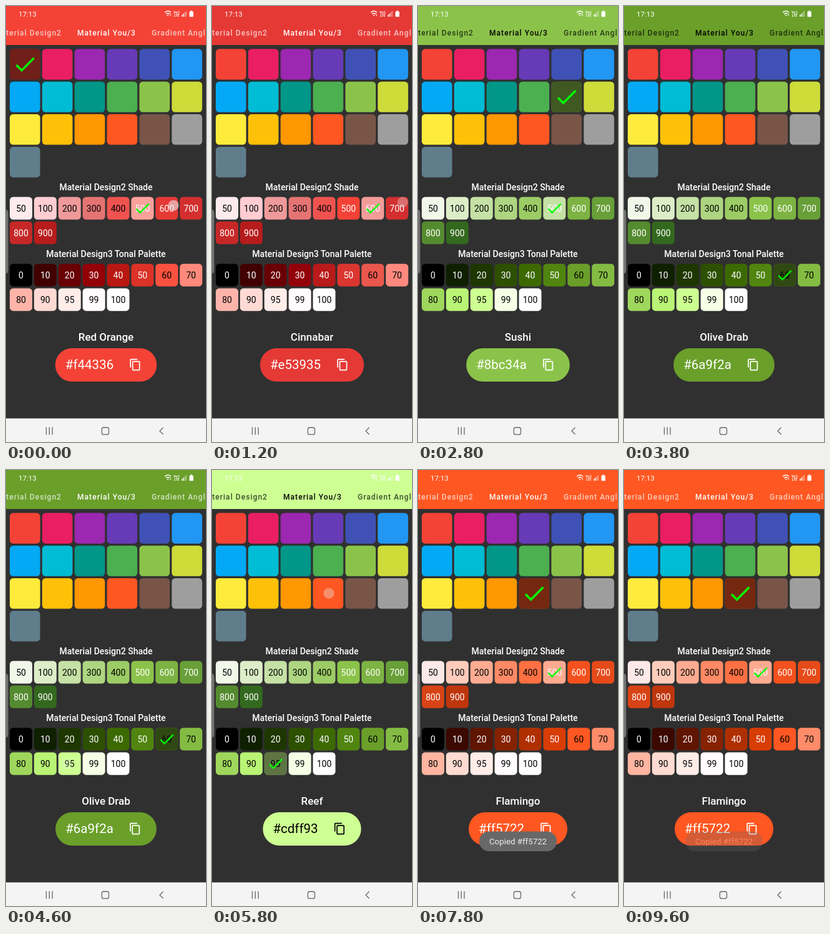
Recreate the animation shown at these times as an HTML page. Size 320 px wide and 693 px high, loop 9.8 s.

```html
<!DOCTYPE html>
<html lang="en">
<head>
<meta charset="utf-8">
<title>Colour palette</title>
<style>
  html, body { margin: 0; width: 100%; height: 100%; overflow: hidden; background: #303030; }
  svg { display: block; width: 100vw; height: 100vh; font-family: Roboto, "Open Sans", sans-serif; }
  .mid { text-anchor: middle; }
  .tile { font-size: 14px; text-anchor: middle; }
  .tab { font-size: 12px; font-weight: 500; letter-spacing: 1.05px; }
  .head { font-size: 14px; font-weight: 500; fill: #fff; text-anchor: middle; }
</style>
</head>
<body>
<svg viewBox="0 0 320 693" preserveAspectRatio="none">
  <rect width="320" height="693" fill="#303030"/>
  <rect id="bar" width="320" height="62"/>

  <g fill="#fff">
    <text x="20" y="16.5" font-size="11.5">17:13</text>
    <g fill="none" stroke="#fff" stroke-width="1.4">
      <path d="M254 10.2q5-4.4 10 0M256 12.7q3-2.6 6 0"/>
    </g>
    <path d="M257.3 14.2h3.4l-1.7 2.3z"/>
    <path d="M262 13.5l1.2-1.6 1.2 1.6zM262 14.6l1.2 1.6 1.2-1.6z"/>
    <text class="mid" x="273" y="11.6" font-size="5.2" font-weight="700">Vo))</text>
    <text class="mid" x="273" y="16.6" font-size="5.2" font-weight="700">LTE</text>
    <path d="M281 14h1.4v3H281zM283.2 12h1.4v5h-1.4z"/>
    <path d="M285.4 10h1.4v7h-1.4zM287.6 8h1.4v9h-1.4z" opacity=".5"/>
    <path d="M295.2 7.6h2.8v1.2h1a.8.8 0 0 1 .8.8v6.8a.8.8 0 0 1-.8.8h-4.8a.8.8 0 0 1-.8-.8V9.600a.8.8 0 0 1 .8-.8h1z"/>
  </g>

  <g id="tabs" class="tab">
    <text x="89" y="47.300" text-anchor="end" opacity=".7">Material Design2</text>
    <text x="114" y="47.300">Material You/3</text>
    <text x="233" y="47.300" opacity=".7">Gradient Angle</text>
  </g>

  <text class="head" x="160" y="293">Material Design2 Shade</text>
  <text class="head" x="160" y="399">Material Design3 Tonal Palette</text>
  <g id="cells"></g>

  <text id="title" class="mid" x="160" y="531.800" font-size="17" font-weight="500" fill="#fff"></text>
  <rect id="pill" y="544" height="53" rx="26.5"/>
  <g id="label">
    <text id="hex" y="577.300" font-size="20.5"></text>
    <path id="copy" d="M16 1H4a2 2 0 0 0-2 2v14h2V3h12zM19 5H8a2 2 0 0 0-2 2v14a2 2 0 0 0 2 2h11a2 2 0 0 0 2-2V7a2 2 0 0 0-2-2zm0 16H8V7h11z"/>
  </g>

  <path d="M0 324q3.500 0 3.500 5v91q0 5-3.500 5z" fill="#8a8a8a" opacity=".75"/>

  <rect y="655.500" width="320" height="38" fill="#f4f4f4"/>
  <g fill="none" stroke="#666" stroke-width="1.300">
    <path d="M64.500 669.500v12M69.300 669.500v12M74.100 669.500v12"/>
    <rect x="153.300" y="670" width="11.200" height="11.200" rx="3"/>
    <path d="M251.500 670l-5.500 5.500 5.500 5.500"/>
  </g>

  <circle id="touch" r="8.500" fill="#e8e8e8"/>
  <g id="toast">
    <rect x="98" y="574.500" width="124" height="31.500" rx="15.700" fill="#686868"/>
    <text class="mid" x="160" y="595" font-size="13.300" fill="#eee">Copied #ff5722</text>
  </g>
</svg>

<script>
const LOOP = 9800;
const $ = id => document.getElementById(id);
const list = s => s.split(' ').map(c => '#' + c);

const MAIN = list('f44336 e91e63 9c27b0 673ab7 3f51b5 2196f3 03a9f4 00bcd4 009688 4caf50 ' +
  '8bc34a cddc39 ffeb3b ffc107 ff9800 ff5722 795548 9e9e9e 607d8b');
const SHADE_NAMES = [50, 100, 200, 300, 400, 500, 600, 700, 800, 900];
const TONE_NAMES = [0, 10, 20, 30, 40, 50, 60, 70, 80, 90, 95, 99, 100];

const SHADES = {
  red: list('ffebee ffcdd2 ef9a9a e57373 ef5350 f44336 e53935 d32f2f c62828 b71c1c'),
  green: list('f1f8e9 dcedc8 c5e1a5 aed581 9ccc65 8bc34a 7cb342 689f38 558b2f 33691e'),
  orange: list('fbe9e7 ffccbc ffab91 ff8a65 ff7043 ff5722 f4511e e64a19 d84315 bf360c')
};
const TONES = {
  red: list('000000 410000 690003 930006 b91812 dc3228 fb5140 ff8a7b ffb4a9 ffdad4 ffedea fffbff ffffff'),
  cinnabar: list('000000 410002 690005 930009 b91a1a dc3630 ea574c ff897e ffb4ab ffdad5 ffedea fffbff ffffff'),
  green: list('000000 0f2000 1e3700 2d5000 3d6a00 508510 6a9f2a 84bb43 9fd75c b9f475 cdff93 f7ffe7 ffffff'),
  orange: list('000000 3b0900 5f1500 862200 b02f00 d83d06 ff5722 ff8b69 ffb5a0 ffdbd1 ffede8 fffbff ffffff')
};

// [start, family, tones, picked cell / shade / tone, name, hex, tab ink, label ink]
const STATES = [
  [0, 'red', 'red', 0, 5, -1, 'Red Orange', '#f44336', '#fff', '#fff'],
  [300, 'red', 'cinnabar', -1, 6, -1, 'Cinnabar', '#e53935', '#fff', '#fff'],
  [1400, 'red', 'cinnabar', -1, 7, -1, 'Persian Red', '#d32f2f', '#fff', '#fff'],
  [2600, 'green', 'green', 10, 5, -1, 'Sushi', '#8bc34a', '#000', '#fff'],
  [3700, 'green', 'green', -1, -1, 6, 'Olive Drab', '#6a9f2a', '#fff', '#fff'],
  [4750, 'green', 'green', -1, -1, 10, 'Reef', '#cdff93', '#000', '#000'],
  [6100, 'orange', 'orange', 15, 5, -1, 'Flamingo', '#ff5722', '#fff', '#fff']
];
const TAB_LAG = 150;

// [start, end, x, y]
const TOUCHES = [
  [-100, 300, 268, 317], [950, 1360, 305, 312], [2250, 2600, 240, 146],
  [3350, 3700, 258, 428], [4350, 4700, 97, 467], [5750, 6100, 187, 196], [7150, 7500, 206, 570]
];

const tick = (x, y, size) => `<path fill="#0f0" d="M9 16.170 4.830 12l-1.420 1.410L9 19 21 7l-1.410-1.410z"
  transform="translate(${x - size / 2} ${y - size / 2}) scale(${size / 24})"/>`;

const box = (x, y, size, fill, more = '') =>
  `<rect x="${x}" y="${y}" width="${size}" height="${size}" rx="5.5" fill="${fill}" ${more}/>`;

const veil = (x, y, size, ink, icon) =>
  box(x, y, size, ink, `opacity="${ink === '#fff' ? .5 : .54}"`) + tick(x + size / 2, y + size / 2, icon);

function mainGrid(picked) {
  return MAIN.map((c, i) => {
    const x = 6 + i % 6 * 51.85, y = 68.3 + Math.floor(i / 6) * 51.85;
    return box(x, y, 48.6, c) + (i === picked ? veil(x, y, 48.6, '#000', 42) : '');
  }).join('');
}

function tiles(colors, names, top, darkInk, picked) {
  return colors.map((c, i) => {
    const x = 6 + i % 8 * 38.87, y = top + Math.floor(i / 8) * 39;
    const ink = darkInk(names[i]) ? '#000' : '#fff';
    return box(x, y, 36, c) +
      `<text class="tile" x="${x + 18}" y="${y + 23}" fill="${ink}">${names[i]}</text>` +
      (i === picked ? veil(x, y, 36, ink, 30) : '');
  }).join('');
}

function show([, family, tones, cell, shade, tone, name, hex, , ink]) {
  $('cells').innerHTML = mainGrid(cell) +
    tiles(SHADES[family], SHADE_NAMES, 303.5, n => n < 500, shade) +
    tiles(TONES[tones], TONE_NAMES, 409.7, n => n >= 60, tone);
  $('bar').setAttribute('fill', hex);
  $('title').textContent = name;
  $('hex').textContent = hex;
  const w = $('hex').getComputedTextLength() + 85, left = 160 - w / 2;
  $('pill').setAttribute('x', left);
  $('pill').setAttribute('width', w);
  $('pill').setAttribute('fill', hex);
  $('hex').setAttribute('x', left + 16);
  $('copy').setAttribute('transform', `translate(${left + w - 44.5} 560) scale(.85)`);
  $('label').setAttribute('fill', ink);
}

const clamp = v => Math.max(0, Math.min(1, v));
const stateAt = t => STATES.findLast(s => s[0] <= t) || STATES[0];
let current;

function draw(t) {
  const state = stateAt(t);
  if (state !== current) show(current = state);
  $('tabs').setAttribute('fill', stateAt(t - TAB_LAG)[8]);

  const touch = TOUCHES.find(p => t >= p[0] && t < p[1]);
  $('touch').setAttribute('opacity', touch ? .6 * clamp((t - touch[0]) / 80) * clamp((touch[1] - t) / 280) : 0);
  if (touch) {
    $('touch').setAttribute('cx', touch[2]);
    $('touch').setAttribute('cy', touch[3]);
  }
  $('toast').setAttribute('opacity', clamp((t - 7450) / 300) * clamp((9770 - t) / 600));
}

const begin = performance.now();
function frame() {
  draw((performance.now() - begin) % LOOP);
  requestAnimationFrame(frame);
}
frame();
</script>
</body>
</html>
```
